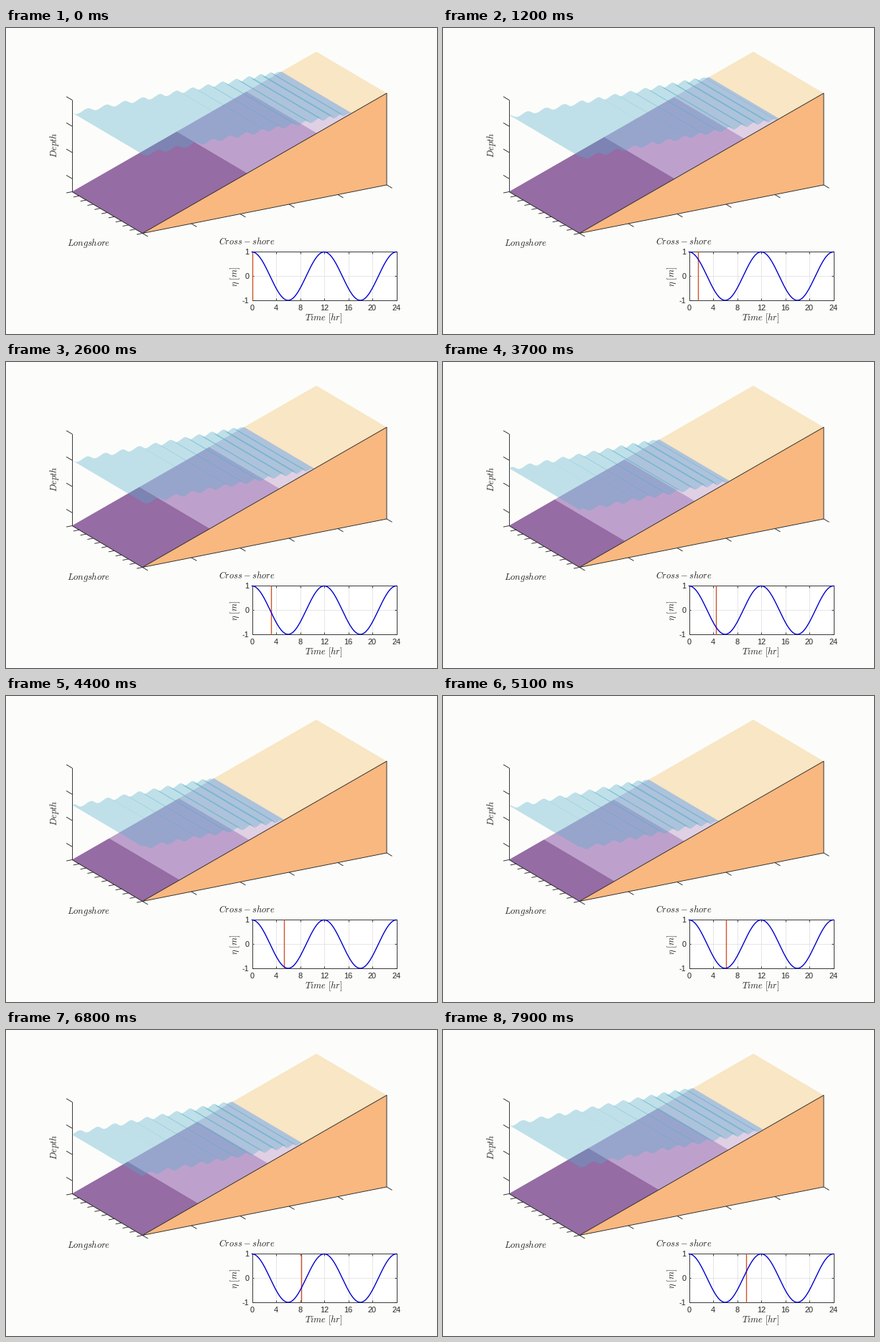
Write a matplotlib script that moves like this. It is 600 px wide and 427 px high and loops after 8 s.

```python
import numpy as np
import matplotlib.pyplot as plt
from matplotlib.animation import FuncAnimation
from matplotlib.collections import PolyCollection
from matplotlib.patches import Polygon

W, H, DPI = 600, 427, 100
FRAMES, INTERVAL = 80, 100
STEP = 24 / 199                      # tide hours per frame

ORIGIN = np.array([92, 228.5])       # back-left corner of the bed
LONG = np.array([98, 58])            # longshore edge
CROSS = np.array([340, -67.5])       # cross-shore edge at constant depth
RISE = 128                           # screen height of the full depth range
DEPTH = 7                            # bed runs from z = -5 to z = 2
UNIT = RISE / DEPTH

PAPER, INK = "#fcfdfa", "#262626"
SAND, SHALLOW, MID, DEEP = "#f8e6c4", "#e0d0e4", "#bda1cc", "#956ca4"
FACE, WATER = "#f8b880", (0.33, 0.68, 0.80, 0.36)

plt.rcParams["mathtext.fontset"] = "cm"
plt.rcParams["font.family"] = "Liberation Sans"


def px(size):
    return size * 72 / DPI


def project(s, l, z):
    """s, l in 0..1 along the two shores, z in screen pixels above the floor."""
    s = np.asarray(s, float)
    x = ORIGIN[0] + CROSS[0] * s + LONG[0] * l
    y = ORIGIN[1] + CROSS[1] * s + LONG[1] * l - z
    return np.column_stack([np.atleast_1d(x), np.atleast_1d(y)])


def bed(s0, s1):
    s = np.array([s0, s1])
    return np.vstack([project(s, 0, RISE * s), project(s[::-1], 1, RISE * s[::-1])])


# The small margin keeps the pixel size from being rounded down.
fig = plt.figure(figsize=((W + 0.01) / DPI, (H + 0.01) / DPI), dpi=DPI,
                 facecolor=PAPER)
ax = fig.add_axes([0, 0, 1, 1])
ax.set_xlim(0, W)
ax.set_ylim(H, 0)
ax.axis("off")


def line(*pts, color=INK, width=0.9, z=4):
    xs, ys = zip(*pts)
    return ax.plot(xs, ys, color=color, lw=px(width), zorder=z,
                   solid_capstyle="butt")[0]


def label(x, y, text, size=12.5, **kw):
    kw = {"ha": "center", "va": "center", "color": INK, **kw}
    ax.text(x, y, text, fontsize=px(size), **kw)


# Slope
ax.add_patch(Polygon(bed(0, 1), fc=SAND, lw=0, zorder=1))
zones = []
for drop, color in ((0, SHALLOW), (1, MID), (3, DEEP)):
    patch = Polygon(bed(0, 1), fc=color, lw=0, zorder=1)
    zones.append((drop, ax.add_patch(patch)))

toe = project(0, 1, 0)[0]
top = project(1, 1, RISE)[0]
foot = project(1, 1, 0)[0]
ax.add_patch(Polygon([toe, top, foot], fc=FACE, ec=INK, lw=px(0.9),
                     joinstyle="round", zorder=2))

# Axes of the block
line(ORIGIN, toe)
line(ORIGIN, ORIGIN - [0, RISE])
for z in (-4, -2, 0, 2):
    p = ORIGIN - [0, (z + 5) * UNIT]
    line(p, p - [8, 4.7])
for s in np.linspace(0, 1, 6):
    p = project(s, 1, 0)[0]
    line(p, p + [7.5, 4.4])
for l in np.linspace(0, 1, 11):
    p = project(0, l, 0)[0]
    line(p, p + [-8, 1.6])

label(67.5, 163.5, "$Depth$", rotation=90)
label(115, 300, "$Longshore$")
label(335, 297.5, "$Cross-shore$")

# Tide chart
X0, X1, Y0, Y1 = 342.5, 543.5, 312.5, 380
YM = (Y0 + Y1) / 2


def chart_x(t):
    return X0 + (X1 - X0) * t / 24


ax.add_patch(Polygon([(X0, Y0), (X1, Y0), (X1, Y1), (X0, Y1)],
                     fc="white", ec=INK, lw=px(0.9), zorder=3))
for t in range(0, 25, 4):
    x = chart_x(t)
    if 0 < t < 24:
        line((x, Y0), (x, Y1), color="#e0e0e0", width=0.8)
        line((x, Y1), (x, Y1 - 2.5))
        line((x, Y0), (x, Y0 + 2.5))
    label(x, 391, str(t), 11)
line((X0, YM), (X1, YM), color="#e0e0e0", width=0.8)
for v in (1, 0, -1):
    y = YM - v * (Y1 - Y0) / 2
    line((X0, y), (X0 + 2.5, y))
    line((X1, y), (X1 - 2.5, y))
    label(338.5, y + 0.5, str(v), 11, ha="right")
hours = np.linspace(0, 24, 300)
ax.plot(chart_x(hours), YM - (Y1 - Y0) / 2 * np.cos(2 * np.pi * hours / 12),
        color="#0000d0", lw=px(1.4), zorder=6)
label(442.5, 405, r"$Time\ [hr]$")
label(319.5, 346.5, r"$\eta\ [m]$", rotation=90)

cursor = line((X0, Y0), (X0, Y1), color="#d0542a", width=1.4, z=5)
water = PolyCollection([], facecolors=[WATER], linewidths=0, zorder=7)
ax.add_collection(water)


def cycles(h):
    """Wave count between the shoreline and depth h."""
    return 3.765 * h ** 0.75


def surface(n, tide):
    """Water height above the floor, with waves steepening shoreward."""
    shore = (5 + tide) / DEPTH
    s = np.linspace(0, shore, 1600)
    h = np.maximum((shore - s) * DEPTH, 1e-6)
    phase = 2 * np.pi * (cycles(h) - cycles(h[0]) + 0.04 + 0.847 * n)
    skew = 0.7 * np.exp(-h / 3)
    amp = 2.4 * np.tanh(3 * h)
    wave = amp / skew * np.arctan2(skew * np.sin(phase), 1 - skew * np.cos(phase))
    return s, np.maximum((5 + tide) * UNIT + wave, RISE * s)


def sheets(s, z):
    """Split the surface at its folds so overlapping layers build up colour."""
    back, front = project(s, 0, z), project(s, 1, z)
    across = back[:, 1] - back[:, 0] * LONG[1] / LONG[0]
    turn = np.flatnonzero(np.diff(np.sign(np.diff(across)))) + 1
    cuts = [0, *turn, len(s) - 1]
    return [np.vstack([back[a:b + 1], front[a:b + 1][::-1]])
            for a, b in zip(cuts, cuts[1:])]


def draw(n):
    t = n * STEP
    tide = np.cos(2 * np.pi * t / 12)
    for drop, patch in zones:
        patch.set_xy(bed(0, (5 + tide - drop) / DEPTH))
    water.set_verts(sheets(*surface(n, tide)))
    cursor.set_xdata([chart_x(t)] * 2)
    return [water, cursor]


anim = FuncAnimation(fig, draw, frames=FRAMES, interval=INTERVAL,
                     repeat=True, repeat_delay=0, blit=False)
plt.show()
```
